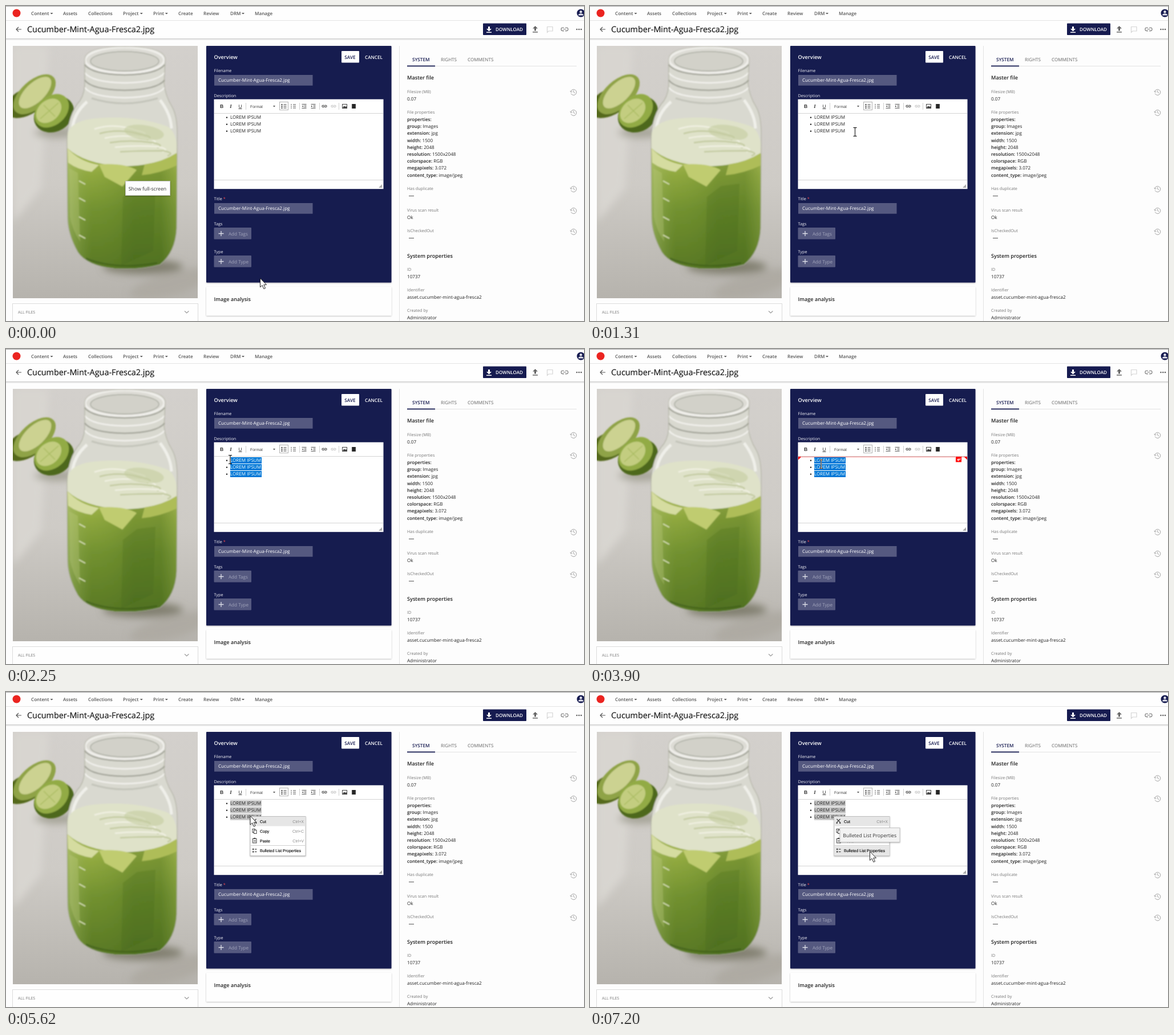
An HTML page for the animation above (8000 ms loop, 1013 px wide and 553 px high).

```html
<!DOCTYPE html>
<html lang="en">
<head>
<meta charset="utf-8">
<title>Asset editor</title>
<style>
html, body { margin: 0; width: 100%; height: 100%; overflow: hidden; background: #fdfdfd; }
svg { display: block; width: 1013px; height: 553px; }
text { font-family: "Open Sans", "Noto Sans", sans-serif; text-rendering: geometricPrecision; white-space: pre; }
.ui { font-family: "Liberation Sans", Arial, sans-serif; }
#beam { mix-blend-mode: difference; }
</style>
</head>
<body>
<svg id="stage" viewBox="0 0 1013 553" xmlns="http://www.w3.org/2000/svg"></svg>
<script>
const LOOP = 8000, NAVY = '#161b50', FIELD = '#555980', INK = '#222', GREY = '#777';

const rect = (x, y, w, h, fill, more = '') =>
  `<rect x="${x}" y="${y}" width="${w}" height="${h}" fill="${fill}" ${more}/>`;
const line = (d, stroke, width = 1, more = '') =>
  `<path d="${d}" fill="none" stroke="${stroke}" stroke-width="${width}" ${more}/>`;
const shape = (d, fill, more = '') => `<path d="${d}" fill="${fill}" ${more}/>`;
const oval = (x, y, rx, ry, fill, turn = 0, more = '') =>
  `<ellipse cx="${x}" cy="${y}" rx="${rx}" ry="${ry}" fill="${fill}" transform="rotate(${turn} ${x} ${y})" ${more}/>`;
// y is the middle of the capital letters
const text = (x, y, str, fill = INK, size = 8.1, weight = 400, more = '') =>
  `<text x="${x}" y="${y + size * 0.36}" fill="${fill}" font-size="${size}" font-weight="${weight}" ${more}>${str}</text>`;
const group = (id, body, more = '') => `<g id="${id}" ${more}>${body}</g>`;
const gradient = (id, dir, ...stops) =>
  `<linearGradient id="${id}" x1="0" y1="0" ${dir}>` +
  stops.map(([at, c, o = 1]) => `<stop offset="${at}" stop-color="${c}" stop-opacity="${o}"/>`).join('') +
  '</linearGradient>';

const jar = 'M138 93Q140 72 208 71Q277 72 279 93L277 136Q279 158 291 177Q300 193 300 225L299 390' +
  'Q297 432 270 454Q235 464 190 461Q142 456 126 432Q108 400 108 370L107 235Q108 190 130 166Q139 152 138 130Z';

const defs = `<defs>
  ${gradient('table', 'x2="0" y2="1"', [0, '#d3d0cc'], [0.55, '#cecbc6'], [1, '#b6b3ad'])}
  ${gradient('juice', 'x2="0" y2="1"', [0, '#b6c05e'], [0.22, '#91a93f'], [0.5, '#71902f'], [1, '#547321'])}
  ${gradient('shade', 'x2="1" y2="0"', [0, '#a9bd72', 0.6], [0.22, '#7f9f3c', 0.1], [0.6, '#466a1c', 0.3], [0.85, '#466a1c', 0.35], [1, '#8ba447', 0.35])}
  <clipPath id="photoClip">${rect(12, 70, 324, 443, '#fff')}</clipPath>
  <clipPath id="jarClip"><path d="${jar}"/></clipPath>
  <clipPath id="editClip">${rect(365, 189, 296, 116, '#fff')}</clipPath>
  <clipPath id="selClip">${[0, 1, 2].map(i => rect(393, 190 + 12 * i, 55, 11, '#fff')).join('')}</clipPath>
  <filter id="soft" x="-20%" y="-20%" width="140%" height="140%"><feGaussianBlur stdDeviation="1"/></filter>
  <filter id="blur" x="-40%" y="-40%" width="180%" height="180%"><feGaussianBlur stdDeviation="7"/></filter>
  <filter id="drop" x="-10%" y="-20%" width="120%" height="150%"><feDropShadow dx="0" dy="1" stdDeviation=".8" flood-opacity=".28"/></filter>
</defs>`;

function photo() {
  const limes = oval(35, 169, 40, 23, '#54691c', -28) + oval(50, 155, 45, 24, '#8fa347', -42) +
    oval(51, 152, 36, 17, '#ccd291', -44) +
    oval(84, 190, 37, 30, '#4e681c', -32) + oval(80, 184, 34, 25, '#92ab45', -42) +
    oval(75, 184, 25, 18, '#c3cd80', -42) + line('M60 198L92 170M66 174L86 194', '#a9bb60', 1.5);
  const foam = 'M107 228Q110 204 150 198Q225 190 284 212Q301 224 300 260Q255 283 200 281Q137 277 107 249Z';
  const swirls = [0, 1, 2, 3, 4, 5].map(i =>
    line(`M${155 + i * 9} ${216 + i * 8}q35 ${-12 + i * 2} 75 ${3 - i}q22 4 8 9`, i % 2 ? '#c3caa0' : '#f0f0e2', 2.5)).join('');
  const marks = [312, 342, 375, 407].map(y => line(`M128 ${y - 5}l11 6`, '#dfe5bd', 1.6)).join('');
  const rings = [103, 117, 130, 143].map((y, i) =>
    line(`M138 ${y}Q150 ${y + 17} 208 ${y + 18}Q265 ${y + 17} 278 ${y}`, i % 2 ? '#f2f1ed' : '#a5a69b', 2.5)).join('');
  const inJar = rect(100, 65, 210, 400, '#d9d9d0') +
    line('M116 220Q117 190 142 168M290 215Q289 190 270 165', '#f0f0ea', 5) +
    line('M150 162Q206 180 266 162', '#c3c4ba', 3) +
    rect(100, 250, 205, 215, 'url(#juice)') + rect(108, 250, 192, 215, 'url(#shade)') +
    shape('M205 335L230 316L262 312L258 430L202 456Z', '#3f6219', 'opacity=".2"') +
    shape('M111 285L126 293L130 414Q116 393 112 370Z', '#c0cd83', 'opacity=".3"') +
    shape(foam, '#dfe2c9') + swirls +
    oval(242, 222, 35, 13, '#c5cda0', 8, 'opacity=".6"') +
    shape('M108 250Q128 273 163 279L150 291Q125 287 109 275Z', '#d5dca0') +
    shape('M163 278Q208 275 229 288L204 317L173 300Z', '#c0cc70') +
    shape('M243 278Q274 274 299 258V280Q270 294 238 297Z', '#aebd58') +
    line('M140 443Q190 464 265 451', '#36561a', 3, 'opacity=".5"') + marks;
  return `<g clip-path="url(#photoClip)">${rect(12, 70, 324, 443, 'url(#table)')}
    <g filter="url(#blur)">${shape('M12 70H75L62 320L12 380Z', '#d8d5d0')}
    ${oval(88, 222, 38, 9, '#a3a194')}${oval(240, 458, 70, 13, '#817f70')}${oval(290, 488, 75, 20, '#aeaaa3', -15)}</g>
    <g filter="url(#soft)">${limes}<g clip-path="url(#jarClip)">${inJar}</g>
    ${oval(208, 95, 69, 23, '#dddcd5', 0, 'stroke="#efeeea" stroke-width="4"')}
    ${oval(208, 97, 60, 17, '#d2d1c9', 0, 'stroke="#a9aba0" stroke-width="1.5"')}${rings}
    ${line(jar, '#a9ab9a', 1.2, 'opacity=".8"')}</g></g>`;
}

function header() {
  const nav = [[44, 'Content', 80], [100, 'Assets'], [144, 'Collections'], [205, 'Project', 237.3], [258, 'Print', 281.3],
    [302, 'Create'], [346, 'Review'], [393, 'DRM', 415.5], [436, 'Manage']];
  return rect(0, 0, 1013, 57, '#fefefe') + rect(0, 0, 1013, 1, '#a5a5a5') + rect(0, 25, 1013, 1, '#e4e4e4') +
    rect(0, 57, 1013, 1, '#c9c9c9') + rect(0, 58, 1013, 2, '#ececec') +
    '<circle cx="18.5" cy="12.5" r="7" fill="#eb2420"/>' +
    nav.map(([x, name, arrow]) => text(x, 13, name, '#555', 8.1, 600) +
      (arrow ? shape(`M${arrow - 2.5} 12h5l-2.5 2.6z`, '#555') : '')).join('') +
    `<circle cx="1007.5" cy="12.5" r="7" fill="${NAVY}"/><circle cx="1007.5" cy="10.3" r="2.2" fill="#dfe0ea"/>` +
    shape('M1003 16.5q0-3.3 4.5-3.3t4.5 3.3z', '#dfe0ea') +
    line('M27 41H18.5M22 37L18 41L22 45', '#555', 1.2) +
    text(37, 41, 'Cucumber-Mint-Agua-Fresca2.jpg', '#1c1c1c', 14.4, 400, 'stroke="#1c1c1c" stroke-width=".2"') +
    rect(836, 30.5, 76, 20.5, NAVY, 'rx="1"') + text(858, 41, 'DOWNLOAD', '#fff', 8.1, 600) +
    shape('M845 36h3v4h3l-4.5 4.5L842 40h3zM842 45.5h9v1.5h-9z', '#fff') +
    shape('M926 43.5v-4h-3l4.5-4.5l4.5 4.5h-3v4zM923 45h9v1.5h-9z', '#666') +
    line('M948.5 36.5h9.5v7.5h-7l-2.5 2.3z', '#d5d5d5', 1.2) +
    line('M978 38h-2.3a2.8 2.8 0 0 0 0 5.6H978M980 38h2.3a2.8 2.8 0 0 1 0 5.6H980M976.5 40.8h5', '#777', 1.1) +
    [1000.5, 1004.3, 1008].map(x => `<circle cx="${x}" cy="41" r="1.2" fill="#555"/>`).join('');
}

function toolbar() {
  const icon = '#444';
  const bullets = x => [173, 176, 179].map(y => line(`M${x + 3.5} ${y}h5`, icon) +
    rect(x - 0.5, y - 1, 2, 2, icon)).join('');
  const numbers = x => [173, 176, 179].map(y => line(`M${x + 3} ${y}h5M${x} ${y - 1}v2`, icon, 0.9)).join('');
  const indent = (x, d) => line(`M${x - 4} 172.5h8M${x} 174.8h4M${x} 177.1h4M${x - 4} 179.4h8`, icon, 0.9) +
    shape(`M${x - 2.5 + d} 176l${-2 * d}-1.8v3.6z`, icon);
  const link = (x, c) => line(`M${x - 0.5} 174.3h-2a1.6 1.6 0 0 0 0 3.2h2M${x + 0.5} 174.3h2a1.6 1.6 0 0 1 0 3.2h-2M${x - 2} 176h4`, c, 1.1);
  const cap = 'class="ui" text-anchor="middle"';
  return text(378, 176, 'B', '#333', 8.6, 700, cap) +
    text(394, 176, 'I', '#333', 8.8, 700, cap + ' font-style="italic" style="font-family:\'Liberation Serif\',serif"') +
    text(410.5, 175.5, 'U', '#333', 8.4, 400, cap) + line('M407.5 180.3h6', '#333') +
    text(428, 176, 'Format', '#444', 6.95, 400, 'class="ui"') + shape('M468 175h4l-2 2.3z', icon) +
    [420.5, 514.5, 549.5, 583.5].map(x => line(`M${x} 170v12`, '#d0d0d0')).join('') +
    rect(479.5, 168.5, 15, 14, '#fcfcfc', 'stroke="#b5b5b5"') + bullets(483) + numbers(500) +
    indent(522.5, -1) + indent(538.5, 1) + link(558, icon) + link(574, '#c4c4c4') +
    rect(589.5, 172.5, 8, 7, '#fff', 'stroke="#444"') + shape('M590 179l2.5-4 2 2 1.5-1.5 1.5 3.5z', icon) +
    rect(606, 172, 7, 8, '#222') + line('M607 172.5v7M612 172.5v7', '#999', 0.8, 'stroke-dasharray="1"');
}

function editor() {
  const field = y => rect(365, y, 172.5, 18.7, FIELD) + text(372, y + 9.5, 'Cucumber-Mint-Agua-Fresca2.jpg', '#fff');
  const add = (y, name) => rect(364.5, y, 65.5, 20.5, FIELD, 'rx="1"') + text(390, y + 11, name, '#a0a3ba') +
    line(`M372.5 ${y + 10.5}h9M377 ${y + 6}v9`, '#dcdde6', 1.3);
  const label = (y, name) => text(364.5, y, name, '#f2f2f6', 7.25);
  const list = fill => [0, 1, 2].map(i => text(393, 195.5 + 12 * i, 'LOREM IPSUM', fill)).join('');
  return rect(351, 70, 324.5, 415.5, NAVY, 'rx="1" filter="url(#drop)"') +
    text(364.5, 89.5, 'Overview', '#fff', 9.15, 600) +
    rect(588, 79, 31, 20.5, '#fff', 'rx="1"') + text(593.3, 89.7, 'SAVE', NAVY, 8.2, 600) + text(629, 89.7, 'CANCEL', '#fff', 8.1, 600) +
    label(113.5, 'Filename') + field(121) + label(157, 'Description') +
    label(338.5, 'Title <tspan fill="#ff4b4b">*</tspan>') + field(346) +
    label(382.5, 'Tags') + add(389, 'Add Tags') + label(431.5, 'Type') + add(438, 'Add Type') +
    rect(364.5, 163.7, 297, 157.5, '#fff') +
    line('M365 188.5h296M365 305.5h296', '#d4d4d4') + shape('M659 313v6h-6z', '#aaa') + toolbar() +
    [0, 1, 2].map(i => `<circle cx="387" cy="${195.7 + 12 * i}" r="1.2" fill="#222"/>`).join('') + list(INK) +
    group('selection', rect(393, 189, 55, 37, '#0078d7', 'id="selFill"') + group('selText', list('')), 'clip-path="url(#selClip)"') +
    '<g clip-path="url(#editClip)">' + group('insert', line('M365 0H661', '#e00', 1, 'stroke-dasharray="1"') +
      shape('M365-5l5 5l-5 5zM661-5l-5 5l5 5z', '#f00') +
      group('enter', rect(641, -5, 10, 10, '#f00') + line('M648.5-2v3h-4M646.2-1l-2 2l2 2', '#fff', 1.1))) + '</g>';
}

function side() {
  const x = 703;
  const clock = y => line(`M990.2 ${y + 2.5}A5 5 0 1 0 990 ${y - 1}M988.8 ${y - 2}l1.2 2.4l2.5-1M994.8 ${y - 3}v3.4l2.6 1.5`, '#a3a3a3', 1);
  const labels = [[150, 'Filesize (MB)'], [186, 'File properties'], [320, 'Has duplicate'], [358, 'Virus scan result'],
    [394, 'IsCheckedOut'], [462, 'ID'], [498, 'Identifier'], [534, 'Created by']];
  const values = [[163, '0.07'], [371, 'Ok'], [475, '10737'], [511, 'asset.cucumber-mint-agua-fresca2'], [547, 'Administrator']];
  const props = ['properties:', 'group: Images', 'extension: jpg', 'width: 1500', 'height: 2048', 'resolution: 1500x2048',
    'colorspace: RGB', 'megapixels: 3.072', 'content_type: image/jpeg'];
  return line('M689.5 70V553M703 105.5H1000', '#e2e2e2') + rect(703, 104.5, 49, 1.8, NAVY) +
    text(712, 94.5, 'SYSTEM', NAVY, 8.2, 600) + text(762, 94.5, 'RIGHTS', '#666') + text(809, 94.5, 'COMMENTS', '#666') +
    text(x, 126, 'Master file', INK, 9.15, 600) + text(x, 438.5, 'System properties', INK, 9.15, 600) +
    labels.map(([y, s]) => text(x, y, s, GREY, 7.25)).join('') + values.map(([y, s]) => text(x, y, s)).join('') +
    props.map((s, i) => text(x, 199 + 12.2 * i, s.replace(/^\w+:/, '<tspan font-weight="600">$&</tspan>'))).join('') +
    line('M706 333.5h9M706 407.5h9', '#555') + [151, 187, 321, 359, 396].map(clock).join('');
}

function menu() {
  const rows = [['Cut', 'Ctrl+X'], ['Copy', 'Ctrl+C'], ['Paste', 'Ctrl+V'], ['Bulleted List Properties', '']];
  const mid = i => 227 + 17.1 * i, c = '#444';
  const icons = line('M432.5 223l6 6M438.5 223l-6 6', c, 1.2) +
    '<circle cx="432.7" cy="230" r="1.2" fill="#444"/><circle cx="438.3" cy="230" r="1.2" fill="#444"/>' +
    rect(432, 240.5, 4.5, 6, '#fff', `stroke="${c}"`) + rect(434.5, 242.5, 4.5, 6, '#fff', `stroke="${c}"`) +
    rect(432.5, 257.5, 6.5, 7.5, '#fff', `stroke="${c}"`) + rect(434, 256, 3.5, 2, c) + line('M434 260.5h4M434 262.7h4', c, 0.8) +
    [276, 280.5].map(y => rect(432, y - 1.2, 2.4, 2.4, c) + line(`M436 ${y}h3.5`, c, 1.2)).join('');
  return rect(428, 218.5, 97, 69, '#fff', 'stroke="#bdbdbd" filter="url(#drop)"') +
    rows.map((r, i) => rect(428.5, mid(i) - 8, 96, 16.5, '#e6e6e6', `id="row${i}"`)).join('') +
    line('M428.5 269.5h96', '#d0d0d0') + icons +
    rows.map(([name, keys], i) => text(445, mid(i), name, '#111', 7, 400, 'class="ui" stroke="#111" stroke-width=".15"') +
      text(522, mid(i), keys, '#888', 7, 400, 'class="ui" text-anchor="end"')).join('');
}

const tip = (id, x, y, w, fill, str) => group(id,
  rect(x + 0.5, y + 0.5, w, 25, fill, 'stroke="#c3c3c3" filter="url(#drop)"') + text(x + 5.8, y + 13.5, str, '#333', 8.7));

const $ = id => document.getElementById(id);
$('stage').innerHTML = defs + rect(0, 0, 1013, 553, '#fdfdfd') + header() + photo() +
  rect(11.5, 522.5, 325, 40, '#fefefe', 'stroke="#dcdcdc"') + text(21, 537, 'ALL FILES', GREY, 6.95) +
  line('M313 535.5l3.7 3.5l3.7-3.5', '#999', 1.1) +
  rect(351, 493, 324.5, 50.5, '#fefefe', 'rx="1" filter="url(#drop)"') + text(364.5, 514.5, 'Image analysis', INK, 9.1, 600) +
  editor() + side() + group('menu', menu()) +
  tip('photoTip', 209, 307, 78, '#fefefe', 'Show full-screen') +
  tip('menuTip', 437.5, 238, 105, '#f2f2f2', 'Bulleted List Properties') +
  group('arrow', shape('M0 0V15.6L3.6 12.3L6.4 18.6L9 17.4L6.3 11.3H11Z', '#fff', 'stroke="#111" stroke-width=".9"')) +
  group('beam', line('M-3-7.5h2.3L0-6.8L.7-7.5H3M-3 7.5h2.3L0 6.8L.7 7.5H3M0-7V7', '#fff', 1.1));

// time, x, y of the pointer, which jumps from place to place
const path = [[0, 445.5, 478], [620, 440.5, 321], [770, 446, 277], [920, 458, 252], [1040, 466, 234], [1190, 465, 227],
  [1310, 464.5, 221], [1700, 441, 217], [1820, 418, 206], [1980, 396, 197], [2130, 394, 195], [2250, 393, 194],
  [3900, 405, 202], [4050, 410, 206], [4170, 416, 211], [4290, 421, 215], [4410, 425, 218], [4530, 427.5, 219],
  [5620, 428, 217.5], [6020, 438, 230], [6140, 455, 247], [6260, 468.5, 260], [6420, 476.5, 269], [6570, 481, 273],
  [6690, 486, 277], [6810, 489, 279], [6930, 490.5, 280]];
const pointer = t => path.findLast(p => p[0] <= t).slice(1);
const show = (id, on) => { $(id).style.display = on ? '' : 'none'; };

function draw(t) {
  const [x, y] = pointer(t), inMenu = t >= 5620, isArrow = t < 770 || inMenu;
  show('arrow', isArrow);
  show('beam', !isArrow);
  $(isArrow ? 'arrow' : 'beam').setAttribute('transform', `translate(${x} ${y})`);
  show('photoTip', t < 620);
  show('menu', inMenu);
  show('menuTip', t >= 7200);

  // the selection runs from the dragged pointer to the end of the list
  show('selection', t >= 1700);
  const [sx, sy] = pointer(Math.min(t, 2250)), first = Math.floor((sy - 189.5) / 12);
  [...$('selClip').children].forEach((r, i) => {
    const from = i > first ? 393 : sx;
    r.setAttribute('x', from);
    r.setAttribute('width', i < first ? 0 : Math.max(0, 448 - from));
  });
  $('selFill').setAttribute('fill', inMenu ? '#c8c8c8' : '#0078d7');
  for (const e of $('selText').children) e.setAttribute('fill', inMenu ? INK : '#fff');

  const above = t >= 3400 && t < 4050;
  show('insert', above || (t >= 4290 && t < 5220));
  $('insert').setAttribute('transform', `translate(0 ${above ? 189.5 : 233.5})`);
  $('enter').setAttribute('transform', `translate(0 ${above ? 4 : 0})`);

  const hover = y < 235 ? 0 : y < 252 ? 1 : y < 270 ? 2 : 3;
  for (let i = 0; i < 4; i++) show('row' + i, i === 0 || i === hover);
}

function tick() {
  draw(performance.now() % LOOP);
  requestAnimationFrame(tick);
}
tick();
</script>
</body>
</html>
```
